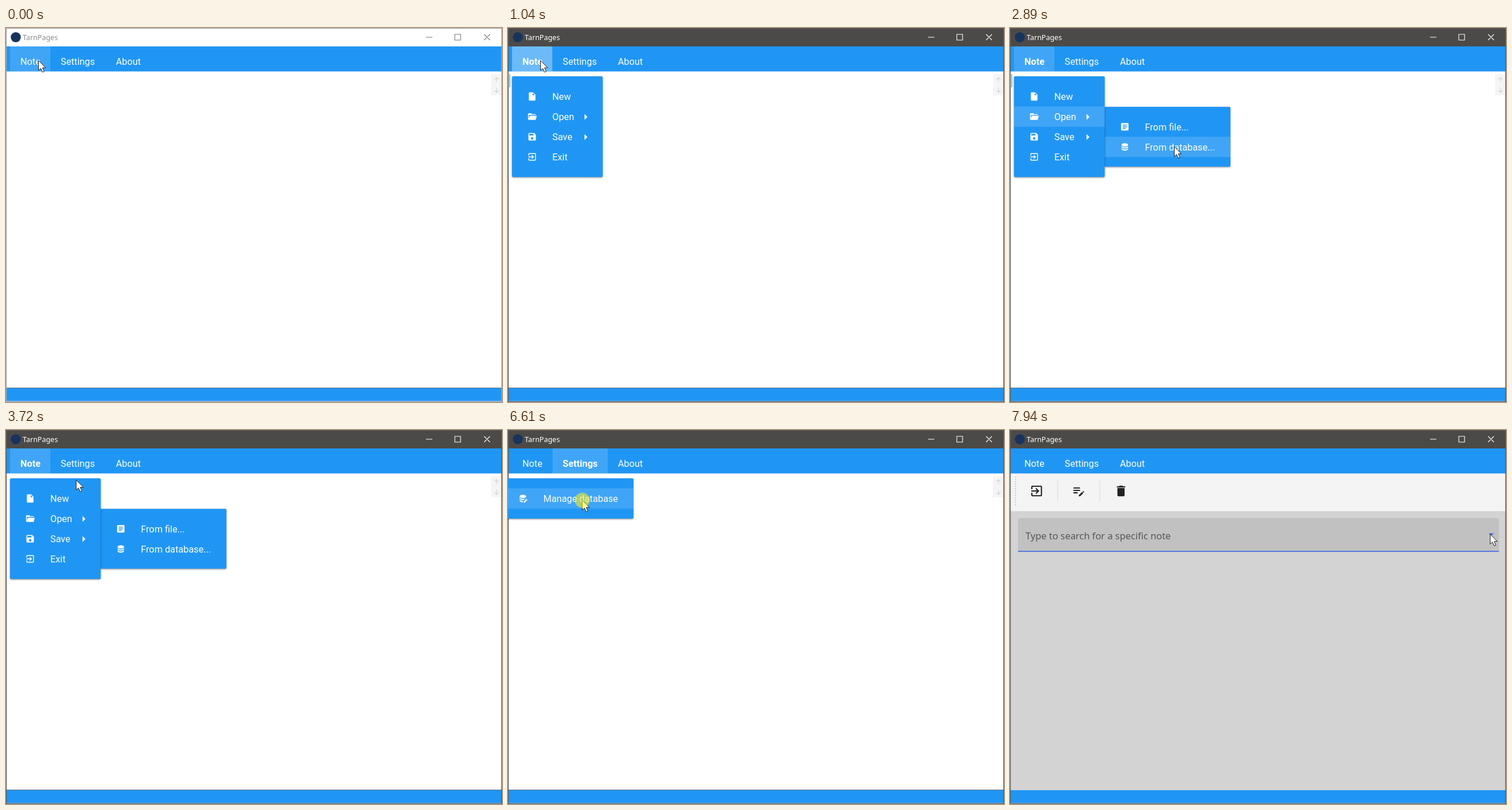
Recreate the animation shown at these times as an HTML page. Size 862x650 px, loop 8000 ms.

```html
<!DOCTYPE html>
<html lang="en">
<head>
<meta charset="utf-8">
<title>Notes menu</title>
<style>
  html, body { margin: 0; height: 100%; overflow: hidden; background: #fff; }
  svg { display: block; width: 862px; height: 650px; }
  text { font: 16.25px Roboto, sans-serif; fill: #fff; }
  .caption { font: 12.5px "Noto Sans", sans-serif; }
  .hint { font: 16.4px "Noto Sans", sans-serif; fill: #565656; }
  .blue { fill: #2096f4; }
  .hover { fill: #fff; opacity: .14; }
  .panel { fill: #2096f4; filter: drop-shadow(0 1px 1.5px #0007); }
  .menu use, .menu path { fill: #fff; }
  .line { fill: none; stroke-width: 1.1; }
</style>
</head>
<body>
<svg viewBox="0 0 862 650">
  <defs>
    <path id="file" d="M13 9V3.5L18.5 9M6 2A2 2 0 0 0 4 4V20A2 2 0 0 0 6 22H18A2 2 0 0 0 20 20V8L14 2Z"/>
    <path id="folder" d="M19 20H4A2 2 0 0 1 2 18V6A2 2 0 0 1 4 4H10L12 6H19A2 2 0 0 1 21 8H4V18L6.1 10H23.2L20.9 18.5A2 2 0 0 1 19 20Z"/>
    <path id="disk" fill-rule="evenodd" d="M15 9H5V5H15ZM12 19A3 3 0 1 1 12 13A3 3 0 1 1 12 19ZM17 3H5A2 2 0 0 0 3 5V19A2 2 0 0 0 5 21H19A2 2 0 0 0 21 19V7Z"/>
    <path id="exit" d="M19 3H5A2 2 0 0 0 3 5V9H5V5H19V19H5V15H3V19A2 2 0 0 0 5 21H19A2 2 0 0 0 21 19V5A2 2 0 0 0 19 3M10.1 15.6L11.5 17L16.5 12L11.5 7L10.1 8.4L12.7 11H3V13H12.7Z"/>
    <path id="page" fill-rule="evenodd" d="M14 17H7V15H14ZM17 13H7V11H17ZM17 9H7V7H17ZM19 3H5A2 2 0 0 0 3 5V19A2 2 0 0 0 5 21H19A2 2 0 0 0 21 19V5A2 2 0 0 0 19 3Z"/>
    <path id="data" d="M4 7A8 4 0 0 1 20 7A8 4 0 0 1 4 7M4 9V12A8 4 0 0 0 20 12V9A8 4 0 0 1 4 9M4 14V17A8 4 0 0 0 20 17V14A8 4 0 0 1 4 14"/>
    <path id="dataEdit" d="M3 7A8 4 0 0 1 19 7A8 4 0 0 1 3 7M3 9V12A8 4 0 0 0 13 15.8L19 10V9A8 4 0 0 1 3 9M3 14V17A8 4 0 0 0 11 21V18A8 4 0 0 1 3 14M13 19.5L19.5 13L22 15.3L15.4 22H13Z"/>
    <path id="edit" d="M3 10H14V12H3ZM3 6H14V8H3ZM3 14H10V16H3ZM18 12.9L19.4 11.9L21.2 13.6L20.1 15ZM17.3 13.6L12 18.9V21H14.1L19.4 15.7Z"/>
    <path id="bin" d="M19 4H15.5L14.5 3H9.5L8.5 4H5V6H19M6 19A2 2 0 0 0 8 21H16A2 2 0 0 0 18 19V7H6Z"/>
  </defs>

  <rect width="862" height="650" fill="#fff"/>

  <g id="editor">
    <rect id="caret" x="2" y="80" width="2" height="23" fill="#80c1ee"/>
    <rect x="843" y="80" width="18" height="37" fill="#f5f5f5"/>
    <path class="line" stroke="#d2d2d2" d="M852.5 94V86M849 89.5L852.5 86L856 89.5M852.5 104V112M849 108.5L852.5 112L856 108.5"/>
  </g>

  <g id="manager">
    <rect y="75" width="862" height="66" fill="#f4f4f4"/>
    <rect id="editHover" x="84" y="77" width="72" height="60" fill="#e9e9e9"/>
    <path d="M9.5 81V132" stroke="#c9c9c9" stroke-width="2" stroke-dasharray="2 2"/>
    <path d="M83 88V124M156 88V124" stroke="#d9d9d9"/>
    <g id="tools" fill="#212121"></g>
    <rect y="141" width="862" height="486" fill="#d3d3d3"/>
    <path d="M14 211V157Q14 153 18 153H845Q849.500 153 849.500 157V211Z" fill="#c9c9c9"/>
    <path d="M14 210.500H849.500" stroke="#858585"/>
    <g id="fieldHover">
      <path d="M14 211V157Q14 153 18 153H845Q849.500 153 849.500 157V211Z" fill="#c1c1c1"/>
      <rect x="14" y="210" width="835.500" height="1.600" fill="#3c66e4"/>
    </g>
    <text class="hint" x="27" y="189.500">Type to search for a specific note</text>
    <path id="dropArrow" d="M832 179.500H841L836.500 184Z"/>
  </g>

  <rect class="blue" y="32" width="862" height="43.500"/>
  <rect class="blue" y="626" width="862" height="22.500"/>
  <path id="footLine" d="M1 625.500H862" stroke="#6f7478"/>

  <rect id="titleBar" width="862" height="32"/>
  <circle cx="17" cy="16" r="8.700" fill="#17345c"/>
  <text id="caption" class="caption" x="29" y="21">TarnPages</text>
  <path id="controls" class="line" d="M730 16H741M780 11H790V21H780ZM831 11L841 21M841 11L831 21"/>
  <path id="frame" fill="none" d="M.5 .5H861.500V649.500H.5Z" stroke-width="1.400"/>

  <rect id="noteTab" x="7" y="32" width="70" height="43.500" fill="#fff"/>
  <rect id="settingsTab" class="hover" x="77.500" y="32" width="96" height="43.500"/>
  <text id="noteLabel" x="25" y="64">Note</text>
  <text id="settingsLabel" x="95" y="64">Settings</text>
  <text x="191" y="64">About</text>

  <g id="openMenu" class="menu">
    <rect class="panel" x="164" y="137" width="219" height="104" rx="2"/>
    <rect id="dataHover" class="hover" x="164" y="189" width="219" height="35"/>
  </g>
  <g id="noteMenu" class="menu">
    <rect class="panel" x="7" y="84" width="157.500" height="175" rx="2"/>
    <rect id="openHover" class="hover" x="7" y="136.500" width="157.500" height="35"/>
    <path d="M133 149.500L138 154.500L133 159.500ZM133 184.500L138 189.500L133 194.500Z"/>
  </g>
  <g id="settingsMenu" class="menu">
    <rect class="panel" x="-3" y="84" width="221" height="70" rx="2"/>
    <rect id="manageHover" class="hover" x="-3" y="101.500" width="221" height="35"/>
  </g>

  <path id="cursor" d="M0 0V17.300L4 13.600L6.900 20.300L9.800 19L7 12.600H12.400Z" fill="#fff" stroke="#222" stroke-width="1"/>
  <circle id="click" r="13" fill="#ffee20" opacity=".57"/>
</svg>

<script>
const el = id => document.getElementById(id);
const set = (id, name, value) => el(id).setAttribute(name, value);
const show = (id, on) => set(id, 'visibility', on ? 'inherit' : 'hidden');
const fade = (id, amount) => el(id).style.opacity = Math.max(0, Math.min(1, amount));

function icon(parent, name, x, y, scale) {
  el(parent).insertAdjacentHTML('beforeend',
    `<use href="#${name}" transform="translate(${x} ${y}) scale(${scale}) translate(-12 -12)"/>`);
}
function item(parent, name, label, x, y) {
  icon(parent, name, x, y, .72);
  el(parent).insertAdjacentHTML('beforeend', `<text x="${x + 35}" y="${y + 6}">${label}</text>`);
}
[['file', 'New'], ['folder', 'Open'], ['disk', 'Save'], ['exit', 'Exit']]
  .forEach(([name, label], i) => item('noteMenu', name, label, 42, 119 + 35 * i));
item('openMenu', 'page', 'From file...', 199.5, 171.7);
item('openMenu', 'data', 'From database...', 199.5, 206.7);
item('settingsMenu', 'dataEdit', 'Manage database', 26.5, 119);
['exit', 'edit', 'bin'].forEach((name, i) => icon('tools', name, 46.3 + 73.3 * i, 106, 1.04));

// Pointer moves: start, steps, ms per step, end x, end y
const moves = [
  [1190, 2, 80, 132, 152],
  [2100, 1, 80, 133, 153],
  [2180, 5, 75, 290, 206],
  [2890, 8, 75, 186, 208],
  [3570, 3, 75, 122, 87],
  [3800, 1, 80, 123, 57],
  [4890, 1, 60, 125, 84],
  [4960, 7, 76, 129, 122],
  [7070, 6, 76, 843, 189],
  [7620, 5, 80, 834.5, 181]
];
const caretTimes = [[890, 1270], [1840, 2370], [2890, 3420], [3960, 4490], [4960, 5420], [5970, 6520]];

function pointer(t) {
  let x = 56.5, y = 56.5;
  for (const [start, steps, stepMs, toX, toY] of moves) {
    if (t < start) break;
    const k = Math.min(1, (Math.floor((t - start) / stepMs) + 1) / steps);
    const eased = k * k * (3 - 2 * k);
    x += (toX - x) * eased;
    y += (toY - y) * eased;
  }
  return [x, y];
}

function draw(t) {
  const during = (from, to) => t >= from && t < to;
  const active = t >= 730;
  const managing = t >= 6670;

  set('titleBar', 'fill', active ? '#4c4a48' : '#fff');
  set('frame', 'stroke', active ? '#5b5a58' : '#a6a6a6');
  el('caption').style.fill = active ? '#fff' : '#8c8c8c';
  set('controls', 'stroke', active ? '#fff' : '#777');

  show('noteTab', t < 3800);
  set('noteTab', 'opacity', during(810, 1190) ? .34 : .14);
  show('settingsTab', during(3800, 6670));
  el('noteLabel').style.fontWeight = during(810, 3800) ? 700 : 400;
  el('settingsLabel').style.fontWeight = during(3880, 6670) ? 700 : 400;

  show('noteMenu', during(890, 3880));
  fade('noteMenu', t < 970 ? .6 : t < 3800 ? 1 : .5);
  show('openMenu', during(1710, 3880));
  fade('openMenu', t < 1790 ? .35 : t < 1870 ? .75 : t < 3800 ? 1 : .5);
  show('openHover', during(1270, 3570));
  show('dataHover', during(2330, 3570));
  show('settingsMenu', during(3880, 6760));
  fade('settingsMenu', t < 3960 || managing ? .5 : 1);
  show('manageHover', t >= 5112 && t < 6760 && !managing);

  show('editor', !managing);
  show('caret', caretTimes.some(span => during(...span)));
  show('manager', managing);
  show('footLine', !managing);
  show('editHover', t < 7070);
  fade('fieldHover', (t - 7120) / 250);
  set('dropArrow', 'fill', t < 7374 ? '#757575' : '#3c66e4');

  const place = `translate(${pointer(t)})`;
  set('cursor', 'transform', place);
  set('click', 'transform', place);
  show('click', during(730, 890) || during(6520, 6670));
}

function tick(now) {
  draw(now % 8000);
  requestAnimationFrame(tick);
}
draw(0);
requestAnimationFrame(tick);
</script>
</body>
</html>
```
